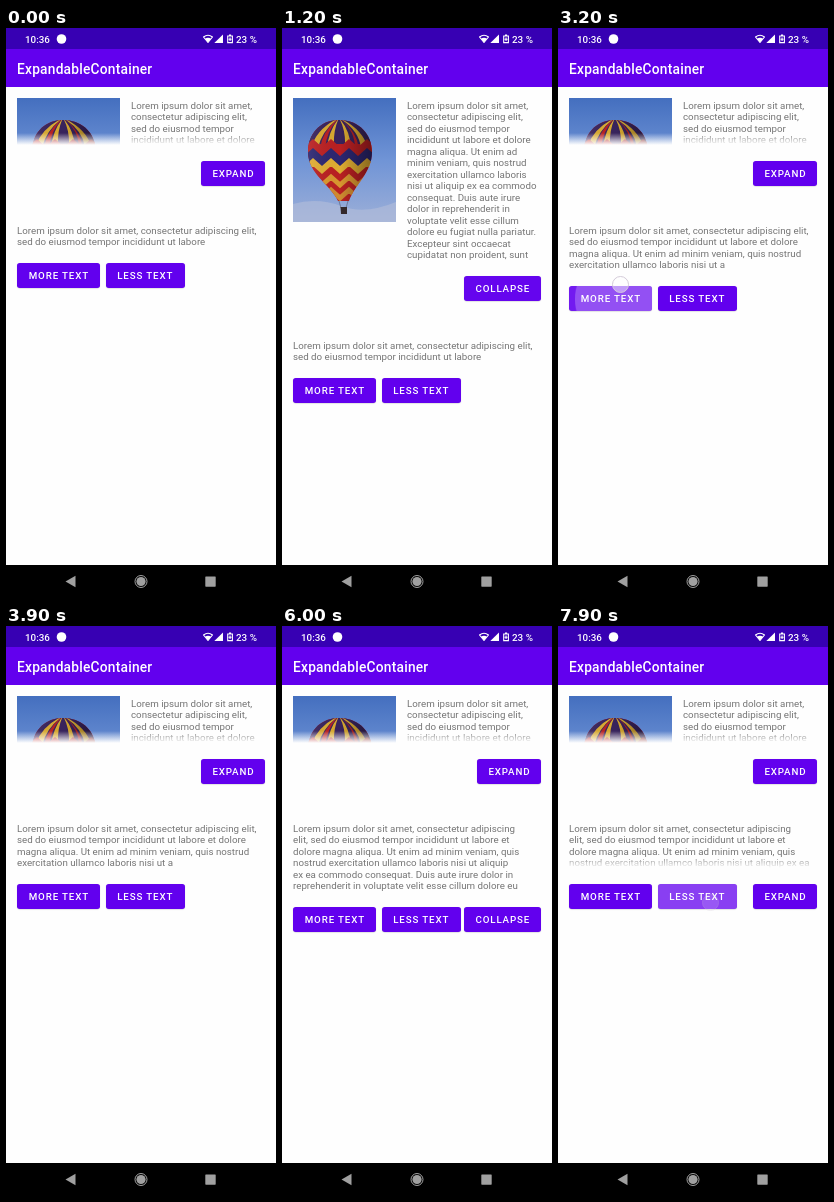
These frames come from a looping animation (270 px wide and 570 px high, 8 s). An HTML page:

```html
<!DOCTYPE html>
<html lang="en">
<head>
<meta charset="utf-8">
<title>Expandable container</title>
<style>
  /* --a, --b: how far each section is open; --c, --d: its button label; --n: text version */
  @property --a { syntax: "<number>"; inherits: true; initial-value: 0; }
  @property --b { syntax: "<number>"; inherits: true; initial-value: 0; }
  @property --c { syntax: "<number>"; inherits: true; initial-value: 0; }
  @property --d { syntax: "<number>"; inherits: true; initial-value: 0; }
  @property --n { syntax: "<number>"; inherits: true; initial-value: 0; }

  @keyframes openTop { 0%, 11% { --a: 0 } 14.63%, 24.55% { --a: 1 } 28.3%, 100% { --a: 0 } }
  @keyframes openLow { 0%, 68.63% { --b: 0 } 72.38%, 82.5% { --b: 1 } 86.25%, 100% { --b: 0 } }
  @keyframes labelTop { 0% { --c: 0 } 11% { --c: 1 } 24.55%, 100% { --c: 0 } }
  @keyframes labelLow { 0% { --d: 0 } 68.63% { --d: 1 } 82.5%, 100% { --d: 0 } }
  @keyframes version { 0% { --n: 0 } 39.75% { --n: 1 } 54.13% { --n: 2 } 98.25%, 100% { --n: 3 } }

  /* Press effects start at their own --at time in the loop */
  @keyframes ripple {
    0% { transform: scale(0); opacity: .24 }
    2.5% { transform: scale(.5); opacity: .24 }
    3.75% { transform: scale(.75); opacity: .17 }
    6.25%, 100% { transform: scale(1); opacity: 0 }
  }
  @keyframes glow { 0% { opacity: 0 } .8%, 3.75% { opacity: .1 } 6.25%, 100% { opacity: 0 } }
  @keyframes touch { 0%, 2.6% { opacity: 1 } 3.75% { opacity: .3 } 4.4%, 100% { opacity: 0 } }
  @keyframes late { 0% { visibility: hidden } 90%, 100% { visibility: visible } }

  html, body { margin: 0; width: 100%; height: 100%; overflow: hidden; background: #fff; }
  #stage {
    position: relative; width: 270px; height: 570px; overflow: hidden; background: #fefefe;
    font: 9.75px/11.5px Roboto, sans-serif; color: #757575;
    animation: openTop 8s ease-in-out infinite, openLow 8s ease-in-out infinite,
      labelTop 8s step-end infinite, labelLow 8s step-end infinite, version 8s step-end infinite;
  }
  #stage div, #stage p, #stage i, #stage span, .bars, .photo { position: absolute; }
  p { margin: 0; white-space: pre; }

  .status { inset: 0 0 auto; height: 20.5px; background: #3700b3; }
  .appbar { left: 0; right: 0; top: 20.5px; height: 38.5px; background: #6200ee; }
  .nav { left: 0; right: 0; top: 537px; height: 33px; background: #000; }
  .bars { left: 0; top: 0; }
  .bars text { font-family: Roboto, sans-serif; font-weight: 500; fill: #fff; }

  .clip { left: 0; width: 270px; overflow: hidden; }
  .clip.top { top: 70px; height: calc(48px + 115px * var(--a)); }
  .clip.low { top: 195px; height: calc(48px + 23px * var(--b)); }
  .clip.top p { left: 125px; top: 1.5px; }
  .clip.low p { left: 11px; top: 1.5px; opacity: calc(1 - max(var(--n) - var(--k), var(--k) - var(--n))); }
  .photo { left: 11px; top: 0; }
  .fade { left: 0; right: 0; bottom: 0; height: 13px; background: linear-gradient(#fefefe00, #fefefe 92%); }
  .top .fade { opacity: calc((1 - var(--a)) * 2.5); }
  .low .fade { opacity: min(clamp(0, var(--n) - 1, 1), (1 - var(--b)) * 2.5); }

  .lower { left: 0; top: calc(115px * var(--a)); width: 270px; height: 400px; }
  .row { left: 0; top: calc(235.2px + 23px * (min(var(--n), 1) + var(--b))); width: 270px; height: 25px; }

  .btn {
    height: 24.75px; border-radius: 2.75px; background: #6200ee; overflow: hidden;
    box-shadow: 0 .5px 1px #0003;
    font-weight: 500; line-height: 26.5px; letter-spacing: .0893em; color: #fff; white-space: nowrap;
  }
  .btn span { left: 11.7px; top: 0; }
  .toggle { right: 11px; width: calc(64.3px + 13px * var(--on)); }
  .toggle span:nth-of-type(1) { opacity: calc(1 - var(--on)); }
  .toggle span:nth-of-type(2) { opacity: var(--on); }

  .ripple, .glow, .touch { animation: 8s linear calc(var(--at) * 1ms - 8000ms) infinite; background: #fff; }
  .ripple { width: 180px; height: 180px; margin: -90px; border-radius: 50%; animation-name: ripple; }
  .glow { inset: 0; animation-name: glow; }
  .touch {
    width: 15px; height: 15px; margin: -8px; border: .7px solid #d3cad8; border-radius: 50%;
    background: #ffffff70; animation-name: touch;
  }
  .late { inset: 0; animation: late 8s step-end infinite; }
</style>
</head>
<body>
<div id="stage">
  <div class="clip top">
    <svg class="photo" width="103" height="124" viewBox="0 0 103 124">
      <defs>
        <linearGradient id="sky" x2="0" y2="1">
          <stop stop-color="#446fbf"/><stop offset=".5" stop-color="#7094d6"/><stop offset="1" stop-color="#9cafd8"/>
        </linearGradient>
        <linearGradient id="shade"><stop stop-color="#fff" stop-opacity=".08"/><stop offset=".5" stop-opacity="0"/><stop offset="1" stop-opacity=".4"/></linearGradient>
        <path id="hull" d="M46 22C67 22 79 37 79 54C79 75 62 86 56 103H45C38 87 15 76 15 54C15 37 26 22 46 22Z"/>
        <clipPath id="in"><use href="#hull"/></clipPath>
        <path id="zig" fill="none" d="M2 0l9 8 9-8 9 8 9-8 9 8 9-8 9 8 9-8 9 8"/>
      </defs>
      <path fill="url(#sky)" d="M0 0H103V124H0Z"/>
      <path fill="#b4bfdb" opacity=".6" d="M0 106Q24 99 48 108T103 104V124H0Z"/>
      <g clip-path="url(#in)">
        <path fill="#b92022" d="M0 20H103V104H0Z"/>
        <path fill="#38235c" d="M0 20H103V46H0Z"/>
        <g fill="#d8a930">
          <path d="M46 20Q24 30 18 50H25Q29 32 46 20ZM46 20Q36 32 34 50H41Q40 32 46 20ZM46 20Q53 32 52 50H58Q57 32 46 20ZM46 20Q66 32 68 50H75Q69 30 46 20Z"/>
        </g>
        <path fill="#b92022" d="M46 20Q30 32 27 50H32Q34 32 46 20ZM46 20Q62 32 62 50H66Q63 32 46 20Z"/>
        <use href="#zig" y="47" stroke="#b92022" stroke-width="9"/>
        <use href="#zig" y="56" stroke="#2c2670" stroke-width="9"/>
        <use href="#zig" y="64" stroke="#dfac32" stroke-width="6"/>
        <use href="#zig" y="79" stroke="#d8962f" stroke-width="5"/>
        <use href="#zig" y="92" stroke="#cf8a30" stroke-width="5"/>
        <use href="#hull" fill="url(#shade)"/>
      </g>
      <path fill="none" stroke="#4c4a58" stroke-width=".5" d="M46 103L48 110M55 103L53 110"/>
      <path fill="#33282a" d="M47.500 109H54V116H48Z"/>
    </svg>
    <p>Lorem ipsum dolor sit amet,
consectetur adipiscing elit,
sed do eiusmod tempor
incididunt ut labore et dolore
magna aliqua. Ut enim ad
minim veniam, quis nostrud
exercitation ullamco laboris
nisi ut aliquip ex ea commodo
consequat. Duis aute irure
dolor in reprehenderit in
voluptate velit esse cillum
dolore eu fugiat nulla pariatur.
Excepteur sint occaecat
cupidatat non proident, sunt</p>
    <div class="fade"></div>
  </div>

  <div class="lower">
    <div class="btn toggle" style="--on:var(--c); top:133.2px">
      <span>EXPAND</span><span>COLLAPSE</span>
      <i class="glow" style="--at:720"></i><i class="ripple" style="--at:720; right:26px; top:14px"></i>
      <i class="glow" style="--at:1800"></i><i class="ripple" style="--at:1800; right:26px; top:13px"></i>
    </div>

    <div class="clip low">
      <p style="--k:0">Lorem ipsum dolor sit amet, consectetur adipiscing elit,
sed do eiusmod tempor incididunt ut labore</p>
      <p style="--k:1">Lorem ipsum dolor sit amet, consectetur adipiscing elit,
sed do eiusmod tempor incididunt ut labore et dolore
magna aliqua. Ut enim ad minim veniam, quis nostrud
exercitation ullamco laboris nisi ut a</p>
      <p style="--k:2">Lorem ipsum dolor sit amet, consectetur adipiscing
elit, sed do eiusmod tempor incididunt ut labore et
dolore magna aliqua. Ut enim ad minim veniam, quis
nostrud exercitation ullamco laboris nisi ut aliquip
ex ea commodo consequat. Duis aute irure dolor in
reprehenderit in voluptate velit esse cillum dolore eu</p>
      <p style="--k:3">Lorem ipsum dolor sit amet, consectetur adipiscing
elit, sed do eiusmod tempor incididunt ut labore et
dolore magna aliqua. Ut enim ad minim veniam, quis
nostrud exercitation ullamco laboris nisi ut aliquip ex ea</p>
      <div class="fade"></div>
    </div>

    <div class="row">
      <div class="btn" style="left:11px; width:83px">
        <span>MORE TEXT</span>
        <i class="glow" style="--at:3000"></i><i class="ripple" style="--at:3000; left:51px; top:13px"></i>
        <i class="glow" style="--at:4150"></i><i class="ripple" style="--at:4150; left:51px; top:13px"></i>
      </div>
      <div class="btn" style="left:99.500px; width:79.300px">
        <span>LESS TEXT</span>
        <div class="late"><i class="glow" style="--at:7600"></i><i class="ripple" style="--at:7600; left:52px; top:18px"></i></div>
      </div>
      <div class="btn toggle" style="--on:var(--d); top:0; opacity:clamp(0, var(--n) - 1, 1)">
        <span>EXPAND</span><span>COLLAPSE</span>
        <i class="glow" style="--at:5320"></i><i class="ripple" style="--at:5320; right:31px; top:13px"></i>
        <i class="glow" style="--at:6430"></i><i class="ripple" style="--at:6430; right:37px; top:13px"></i>
      </div>
    </div>
  </div>

  <div class="appbar"></div>
  <div class="status"></div>
  <div class="nav"></div>
  <svg class="bars" width="270" height="570" fill="#fff">
    <text x="19" y="14.500" font-size="9.800">10:36</text>
    <circle cx="55.500" cy="11" r="4.800"/>
    <path fill="none" stroke="#fff" stroke-width="1.100" stroke-linejoin="round" d="M197.500 9Q202 5.500 206.500 9L202 14.500Z"/>
    <path d="M198.900 10.700Q202 8.800 205.100 10.700L202 14.600Z"/>
    <path d="M217 6.500V15H208.300Z"/>
    <path fill="none" stroke="#fff" stroke-width="1.100" d="M221.700 8H226.400V14.600H221.700Z"/>
    <path d="M223 6.500H225.100V8H223ZM223.500 9.500H224.600V10.700H225.600V11.700H224.600V13H223.500V11.700H222.500V10.700H223.500Z"/>
    <text x="230" y="14.500" font-size="9.900">23 %</text>
    <text x="11" y="45.500" font-size="13.750" letter-spacing=".220">ExpandableContainer</text>
    <g fill="#a0a0a0">
      <path d="M59.500 553.500L69.500 547.700V559.300Z"/>
      <circle cx="135" cy="553.500" r="4.600"/>
      <circle cx="135" cy="553.500" r="6" fill="none" stroke="#a0a0a0"/>
      <rect x="199.300" y="548.500" width="10.400" height="10.200" rx=".6"/>
    </g>
  </svg>

  <i class="touch" style="--at:720; left:233px; top:147px"></i>
  <i class="touch" style="--at:1800; left:233px; top:261px"></i>
  <i class="touch" style="--at:3000; left:62px; top:256px"></i>
  <i class="touch" style="--at:4150; left:62px; top:272px"></i>
  <i class="touch" style="--at:5320; left:228px; top:271px"></i>
  <i class="touch" style="--at:6430; left:222px; top:294px"></i>
  <div class="late"><i class="touch" style="--at:7600; left:152px; top:276px"></i></div>
</div>
</body>
</html>
```
